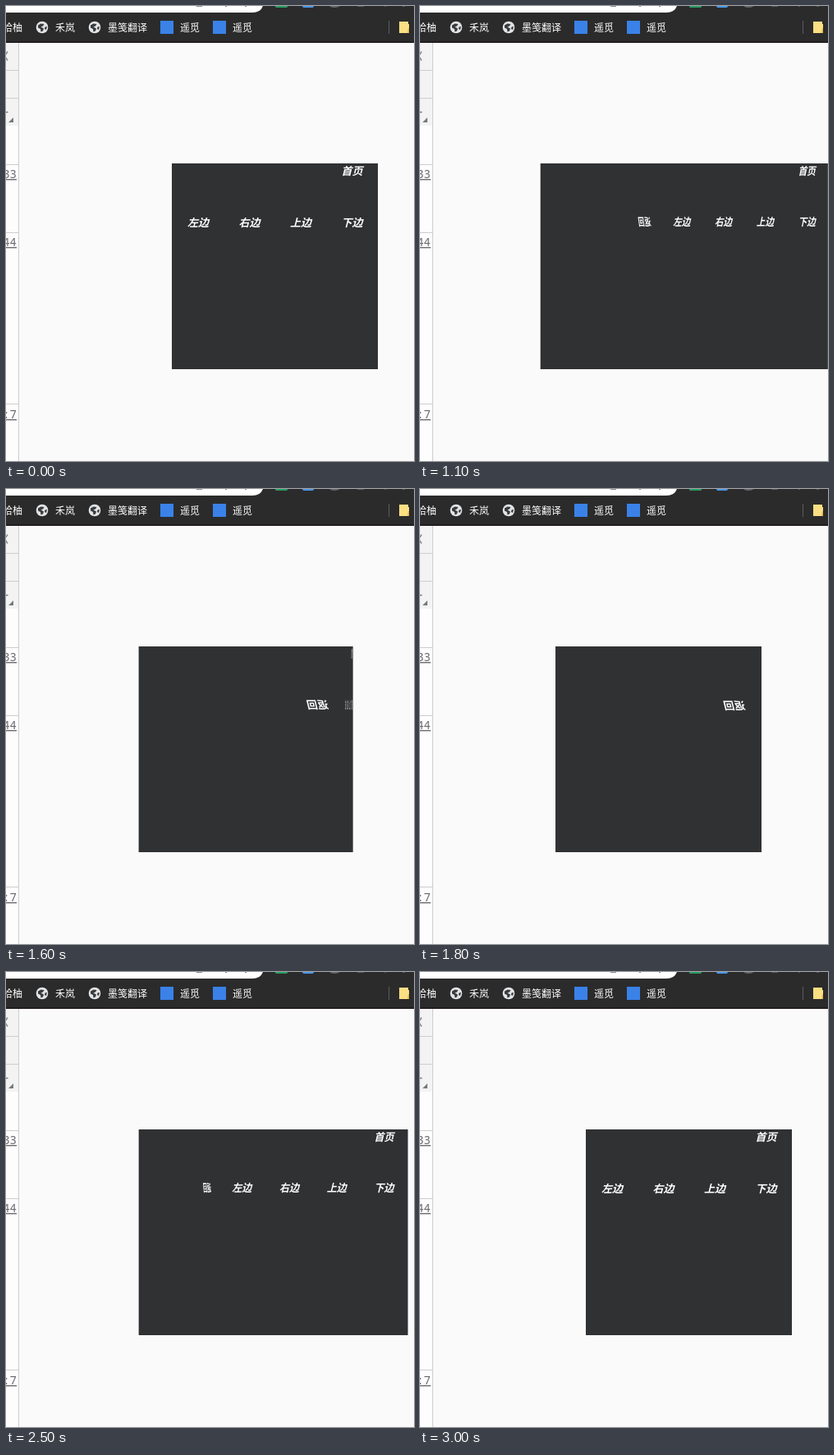
An HTML page for the animation above (3600 ms loop, 497 by 555 pixels).

```html
<!DOCTYPE html>
<html lang="zh-CN">
<head>
<meta charset="utf-8">
<title>Cube navigation</title>
<style>
  html, body { margin: 0; width: 100%; height: 100%; overflow: hidden; background: #fafafa; }
  svg { display: block; }
  text { font: 12px "Noto Sans CJK SC", "Noto Sans CJK", sans-serif; }
  .bookmarks text { fill: #fff; }
  .links text { font: 14px "Noto Sans Mono", "DejaVu Sans Mono", monospace; fill: #6b6b70; text-anchor: end; text-decoration: underline; }
  .face text { font-size: 13px; font-weight: bold; font-style: italic; fill: #fff; text-anchor: middle; }
</style>
</head>
<body>
<svg width="497" height="555" viewBox="0 0 497 555">
  <defs>
    <g id="globe">
      <circle r="7.3" fill="#e2e4e6"/>
      <path d="M-5-2.5L-1.5-4.5 2.5-4 1-1.5-1.5-.5 2 1.5 1 4.5-1.5 5.5-2 2-5 .5ZM3.5-.5L6-1 5 3 3 2Z" fill="#3a3b3d"/>
    </g>
  </defs>
  <rect width="497" height="555" fill="#fafafa"/>

  <!-- side panel -->
  <rect y="45" width="15" height="101" fill="#f3f3f3"/>
  <rect y="146" width="15" height="409" fill="#fdfdfd"/>
  <path d="M0 78.5H15M0 112.5H15M0 193.5H15M0 276.5H15M0 485.5H15M15.5 45V555" stroke="#cdcdcd"/>
  <path d="M2 55.5L-1.5 61 2 66.5" fill="none" stroke="#85878a" stroke-width="1.4"/>
  <path d="M0 129.5H2.5" stroke="#77797c" stroke-width="1.5"/>
  <path d="M9 136V142H3Z" fill="#77797c"/>
  <g class="links">
    <text x="13" y="210">33</text>
    <text x="13" y="293">44</text>
    <text x="13" y="503">:7</text>
  </g>

  <!-- browser bar -->
  <rect width="497" height="45" fill="#2b2b2c"/>
  <rect y="43" width="497" height="2" fill="#231d20"/>
  <path d="M0 0H313Q310 8 300 8H0Z" fill="#fff"/>
  <path d="M232 .5H239M267 .5H269M291 .5H293" stroke="#8b8d91"/>
  <path d="M328 0H343V1Q343 2 341 2H330Q328 2 328 1Z" fill="#2a9c63"/>
  <path d="M361 0H375Q375 2 372 2H364Q361 2 361 0Z" fill="#4a98e8"/>
  <path d="M394 0H407Q404 2 400 2Q396 2 394 0Z" fill="#66686b"/>
  <path d="M428 .5H436M461 .5H463M483 .5H486" stroke="#55575a"/>
  <g class="bookmarks">
    <text x="-4" y="31">拾柚</text>
    <use href="#globe" x="44" y="26"/>
    <text x="60" y="31">禾岚</text>
    <use href="#globe" x="108" y="26"/>
    <text x="124" y="31">墨笺翻译</text>
    <rect x="188" y="18" width="16" height="16" fill="#3a82e8"/>
    <text x="212" y="31">遥觅</text>
    <rect x="252" y="18" width="16" height="16" fill="#3a82e8"/>
    <text x="276" y="31">遥觅</text>
  </g>
  <path d="M466.5 18V34" stroke="#5c5d60"/>
  <path d="M479 19H490V22H491V33H479Z" fill="#fbdf83"/>
  <path d="M490 27H491V33H489Z" fill="#e3b94c"/>

  <!-- cube -->
  <rect id="body" y="192" height="251" fill="#303133"/>
  <g id="front" class="face">
    <text x="219.5" y="13.5">首页</text>
    <text x="32" y="76.5">左边</text>
    <text x="94.5" y="76.5">右边</text>
    <text x="157" y="76.5">上边</text>
    <text x="219.5" y="76.5">下边</text>
  </g>
  <g id="side" class="face">
    <text x="32" y="76.5">返回</text>
  </g>
</svg>
<script>
  const LOOP = 3600, STEP = 100, SIZE = 251, TOP = 192;
  const AXIS = 287.5, LEFT = -85.5, DEPTH = 128.5; // cube edge relative to the turning axis
  const [body, front, side] = ['body', 'front', 'side'].map(id => document.getElementById(id));

  // cubic-bezier(.25, .1, .25, 1)
  function ease(x) {
    if (x >= 1) return 1;
    const curve = (u, a, b) => 3 * u * (1 - u) ** 2 * a + 3 * u * u * (1 - u) * b + u ** 3;
    let lo = 0, hi = 1;
    for (let i = 0; i < 30; i++) {
      const mid = (lo + hi) / 2;
      if (curve(mid, .25, .25) < x) lo = mid; else hi = mid;
    }
    return curve(lo, .1, 1);
  }

  // quarter turn out and back, advancing once per step
  function turn(k) {
    if (k < 9) return 0;
    if (k < 22) return ease(.024 + .11 * (k - 9));
    return 1 - ease(.128 + .108 * (k - 22));
  }

  function draw(now) {
    const angle = turn(Math.floor(now % LOOP / STEP)) * Math.PI / 2;
    const c = Math.cos(angle), s = Math.sin(angle);
    const edge = AXIS + LEFT * c + DEPTH * s;
    body.setAttribute('x', edge - SIZE * s);
    body.setAttribute('width', SIZE * (c + s));
    front.setAttribute('transform', `matrix(${c} 0 0 1 ${edge} ${TOP})`);
    side.setAttribute('transform', `matrix(${-s} 0 0 1 ${edge} ${TOP})`);
  }

  function tick() {
    draw(performance.now());
    requestAnimationFrame(tick);
  }
  tick();
</script>
</body>
</html>
```
